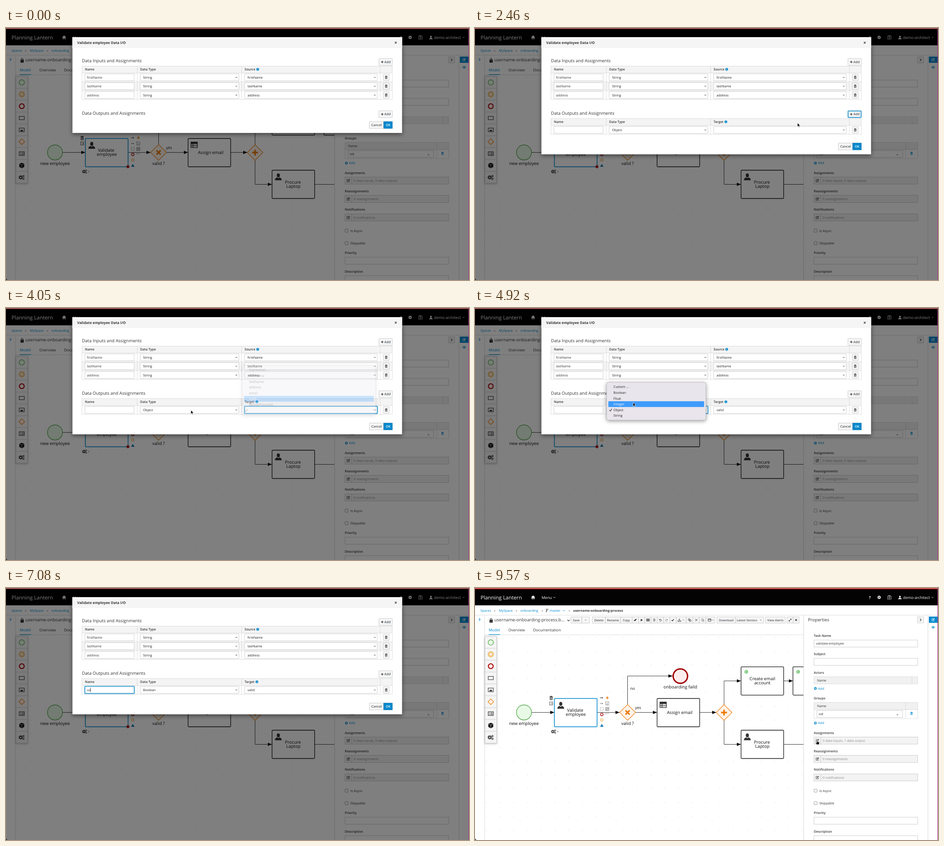
Recreate the animation shown at these times as an HTML page. Size 1015 by 552 pixels, loop 9.6 s.

```html
<!DOCTYPE html>
<html lang="en">
<head>
<meta charset="utf-8">
<title>Data I/O dialog</title>
<style>
html, body { margin: 0; width: 100%; height: 100%; overflow: hidden; background: #fff; }
svg { display: block; width: 1015px; height: 552px; font: 7.2px "Open Sans", sans-serif; text-rendering: geometricPrecision; cursor: default; }
text { white-space: pre; }
</style>
</head>
<body>
<svg id="stage" viewBox="0 0 1015 552"></svg>
<script>
const LOOP = 9600;
const BLUE = '#0088ce', INK = '#363636', LINE = '#d1d1d1', EDGE = '#bbb', ORANGE = '#ec7a08';

// Drawing helpers, all return markup
const R = (x, y, x2, y2, fill = 'none', stroke = 'none', more = '') =>
  `<rect x="${x}" y="${y}" width="${x2 - x}" height="${y2 - y}" fill="${fill}" stroke="${stroke}" stroke-width=".7" ${more}/>`;
const T = (x, y, s, fill = INK, size = 7.2, weight = 400, more = '') =>
  `<text x="${x}" y="${y}" fill="${fill}" font-size="${size}" font-weight="${weight}" ${more}>${s}</text>`;
const P = (d, stroke = INK, w = 1, fill = 'none', more = '') =>
  `<path d="${d}" stroke="${stroke}" stroke-width="${w}" fill="${fill}" ${more}/>`;
const C = (x, y, r, fill, stroke = 'none', w = 1) =>
  `<circle cx="${x}" cy="${y}" r="${r}" fill="${fill}" stroke="${stroke}" stroke-width="${w}"/>`;
const G = (x, y, body, scale = 1) => `<g transform="translate(${x} ${y}) scale(${scale})">${body}</g>`;
const id = (name, body, more = '') => `<g id="${name}" ${more}>${body}</g>`;
const mid = (x, y, s, size = 9.6) => T(x, y, s, '#111', size, 400, 'text-anchor="middle"');

// Icons, centred on x, y
const chev = (x, y, c = INK, s = 1) => G(x, y, P('M-1.9-1L0 .9 1.9-1', c, 1), s);
const right = (x, y, c) => P(`M${x - 1.3} ${y - 2.6}l2.6 2.6-2.6 2.6`, c, 1.2);
const trash = (x, y, c = INK, s = 1) => G(x, y,
  P('M-2.8-2.3H2.8M-1-2.6V-3.2H1V-2.6', c, .9) + P('M-2.1-1.6H2.1V3.2H-2.1Z', c, .7, c, 'fill-opacity=".25"') + P('M-.7-.8V2.4M.7-.8V2.4', c, .5), s);
const person = (x, y, c, s = 1) => G(x, y,
  `<ellipse cy="-3.2" rx="3.4" ry="4.3" fill="${c}"/>` + P('M-7.5 7.5Q-7.5 2.8-2.5 1.3L0 3 2.5 1.3Q7.5 2.8 7.5 7.5Z', 'none', 0, c), s);
const gear = (x, y, c, s = 1) => G(x, y,
  C(0, 0, 2.1, 'none', c, 1.6) + `<circle r="3.3" fill="none" stroke="${c}" stroke-width="1.2" stroke-dasharray="1.3 1.29"/>`, s);
const gears = (x, y, s = 1) => gear(x - 2 * s, y, INK, s) + gear(x + 3 * s, y - 2.4 * s, INK, .55 * s) + gear(x + 3 * s, y + 2.6 * s, INK, .55 * s);
const pen = (x, y, c) => P(`M${x + .8} ${y - 2.4}H${x - 3}V${y + 2.9}H${x + 2.5}V${y + .8}`, c, .8) + P(`M${x - 1} ${y + 1}L${x + 3} ${y - 2.8}`, c, 1.5);
const plus = (x, y, r, c, w) => P(`M${x - r} ${y}h${2 * r}M${x} ${y - r}v${2 * r}`, c, w);
const info = (x, y) => C(x, y, 3, BLUE) + P(`M${x} ${y - .6}v2.3M${x} ${y - 1.9}v.8`, '#fff', .9);
const grid = (x, y, s = 1) => G(x, y, P('M-7-6H7V6H-7ZM-7-2H7M-7 2H7M-2.5-6V6', '#222', 1.3) + R(-7, -6, 7, -3, '#222'), s);
const diamond = (x, y, r, w) => P(`M${x} ${y - r}l${r} ${r}-${r} ${r}-${r}-${r}Z`, ORANGE, w, '#fef3e8');

// Widgets
const input = (x, y, x2, s = '', y2 = y + 15.3) => R(x, y, x2, y2, '#fff', EDGE) + T(x + 4.5, y + 10.4, s);
const select = (x, y, x2, s, name) =>
  R(x, y, x2, y + 15.3, '#fff', EDGE, 'rx=".6"') + T(x + 6.5, y + 10.4, s, '#222', 7.2, 400, name ? `id="${name}"` : '') + chev(x2 - 5.5, y + 7.8);
const button = (x, y, x2, y2, s, tx) => R(x, y, x2, y2, '#f6f6f6', EDGE, 'rx=".6"') + T(tx, (y + y2) / 2 + 2.6, s, '#4d5258', 7.2, 600);
const addBtn = y => button(817.5, y, 847, y + 15, 'Add', 829.6) + plus(824.8, y + 7.5, 2.6, INK, 1.3);

function header() {
  return R(0, 0, 1015, 3, '#c00') + R(0, 2.6, 1015, 38, '#030303') + T(12.3, 25, 'Planning Lantern', '#fff', 11.4) +
    P('M123 20.5L127.4 16.2 131.8 20.5H130.4V24.4H128.3V21.6H126.5V24.4H124.4V20.5Z', 'none', 0, '#fff') +
    T(146, 23.6, 'Menu', '#fff', 8.4) + chev(174, 20.6, '#fff') + T(863.6, 23.6, '?', '#fff', 8.6, 700) + gear(886, 20.5, '#fff') +
    R(904.4, 18, 912.6, 24.4, 'none', '#ddd') + P('M906.8 18V16.4H910.2V18', '#ddd', .9) + C(908.5, 21.2, 1.5, 'none', '#ddd', .9) +
    person(931.5, 20.8, '#fff', .5) + T(938.3, 23.6, 'demo-architect', '#fff', 8.4) + chev(1003, 20.6, '#ddd');
}

function crumbs() {
  const links = [[12, 'Spaces'], [52.6, 'MySpace'], [99.6, 'onboarding'], [163.8, 'master']];
  return links.map(([x, s]) => T(x, 52, s, BLUE)).join('') +
    [41.2, 89, 145.8, 205].map(x => T(x, 51.6, '»', '#666')).join('') +
    P('M156.5 46.5V52M159.6 46.5Q159.6 49.5 156.5 49.8', INK, .9) + C(156.5, 46.4, .9, INK) + C(159.6, 46.4, .9, INK) + C(156.5, 52, .9, INK) +
    chev(194.8, 49.6, BLUE) + T(215.3, 52, 'username-onboarding-process', INK, 7.2, 700) +
    P('M0 59.5H1015', LINE, .7);
}

function toolbar() {
  const y = 70.2;
  const labels = [[210, 234, 'Save'], [257, 286, 'Delete'], [286, 319, 'Rename'], [319, 344.5, 'Copy'],
    [530.5, 571, 'Download'], [571, 633, 'Latest Version'], [637, 680, 'View Alerts']];
  const cells = [[234, 251], [441, 463], [506, 526], [684, 697.3], [697.3, 710.5]];
  for (let i = 0; i < 7; i++) cells.push([344.5 + i * 13.8, 358.3 + i * 13.8]);
  for (let i = 0; i < 3; i++) cells.push([463 + i * 14.3, 477.3 + i * 14.3]);
  return P('M32.3 70H38.3V75.2H32.3ZM33.6 70V67.8Q35.3 64.6 37 67.8V70', INK, 1.1, 'none') + R(32, 70, 38.6, 75.3, INK) +
    T(42.4, 73.4, 'username-onboarding-process.b...', INK, 9.6) + chev(205, 71, INK, 1.3) +
    cells.map(([a, b]) => R(a, 63.2, b, 77, '#f6f6f6', EDGE)).join('') +
    labels.map(([a, b, s]) => R(a, 63.2, b, 77, '#f6f6f6', EDGE) +
      T((a + b) / 2 - (s === 'Latest Version' ? 6 : 0), 72.6, s, '#4d5258', 6.6, 600, 'text-anchor="middle"')).join('') +
    [242.5, 456.5, 521.5, 626.5].map(x => chev(x, y, INK, .8)).join('') +
    P('M348.4 72l3-3.6h3l-3 3.6Z', INK, .6, INK) + P('M363.4 67.4v5.8l4.6-2.9Z', 'none', 0, INK) +
    P('M376 67.6h6.4v5h-6.4ZM376 70h6.4M378.1 67.6v5M380.3 67.6v5', INK, .9) + trash(393, y, '#777', .9) +
    P('M404 68v2h2M404.3 69.6a2.3 2.3 0 1 1 .5 2.7', INK, .9) + P('M422.2 68v2h-2M421.9 69.6a2.3 2.3 0 1 0-.5 2.7', '#888', .9) +
    P('M431 70.2l1.8 1.9 3.2-4', INK, 1.4) + P('M448 67v4M446.2 69.6l1.8 1.8 1.8-1.8M444.8 71v2.2h6.4V71', INK, 1) +
    P('M467.6 67.4h3.4v3.4h-3.4ZM470 69.6h3.4v3.6H470Z', INK, .8) + P('M482.5 67.6l5 4.4M482.5 72.6l5-4.4', INK, .9) +
    P('M496.6 67.4h3.4v4.4h-3.4ZM499 69.6h3v3.6h-3Z', '#888', .8) + P('M511 67.6h6.4v5.2H511ZM511 69.2h6.4', INK, .9) +
    P('M688.4 72.6l4.6-4.6M690.8 67.8h2.4v2.4M690.6 72.8h-2.4v-2.4', INK, 1) + P('M702 68.3l3.8 3.8M705.8 68.3l-3.8 3.8', INK, 1.3) +
    T(30, 94.8, 'Model', BLUE, 8.4) + T(73, 94.8, 'Overview', INK, 8.4) + T(127.5, 94.8, 'Documentation', INK, 8.4) +
    P('M21 102.6H720', LINE, .7) + P('M30 102H55', BLUE, 1.2) + right(10, 69, BLUE) + P('M21 60V552', LINE, .8);
}

function palette() {
  const x = 34.6, y = i => 119.2 + i * 26;
  let s = R(21.8, 106, 47.6, 340, '#f5f5f5', EDGE, 'style="filter:drop-shadow(0 1px 2px #0004)"');
  for (let i = 1; i < 9; i++) s += P(`M21.8 ${106 + i * 26}H47.6`, EDGE, .7);
  return s + C(x, y(0), 5.8, '#e8fae6', '#4aa241', 1.2) + C(x, y(1), 5.9, '#fef0dc', '#e5a02d', 1.1) + C(x, y(1), 3.8, 'none', '#e5a02d', 1) +
    C(x, y(2), 5.3, '#fdecec', '#a30000', 2) + R(29, y(3) - 3.6, 40.2, y(3) + 3.6, 'none', INK, 'style="stroke-width:1.1"') +
    R(29, y(4) - 4, 40.2, y(4) + 4, 'none', INK, 'style="stroke-width:1.1"') + R(32, y(4), 37.4, y(4) + 3, INK) +
    diamond(x, y(5), 6.3, 1.2) + P(`M29 ${y(6) - 4}h11.2v8H29ZM31 ${y(6) - 1.3}h1.6M34 ${y(6) - 1.3}h4.6M31 ${y(6) + 1.5}h1.6M34 ${y(6) + 1.5}h4.6`, INK, 1.2) +
    P(`M${x} ${y(7) - 6}l5.4 2.4v6.6l-5.4 3-5.4-3v-6.6Z`, 'none', 0, '#111') + P(`M${x - 5} ${y(7) - 3.2}l5 2.2 5-2.2M${x} ${y(7) - 1}v6`, '#eee', .7) +
    gears(x, y(8), 1.2);
}

function diagram() {
  const flow = d => P(d, '#222', .9, 'none', 'marker-end="url(#tip)"');
  const task = (x, y, x2, stroke = '#1a1a1a', w = 1.3) => R(x, y, x2, y + 62, '#fff', stroke, `rx="1.5" style="stroke-width:${w}"`);
  const leaf = x => C(x, 183.4, 4, '#7bc67b') + P(`M${x - 4} 182h5M${x - 3} 185h4`, '#fff', .9);
  return R(21.5, 103, 720, 552, 'url(#dots)') +
    flow('M124 272.6H174') + flow('M268 272.6H317') + flow('M334.5 255V192.8H433') + flow('M352 272.6H399') + flow('M492.5 272.6H529') +
    flow('M546 256V203.5H583') + flow('M546 289V342.5H583') + flow('M676.5 203.5H697') + P('M676.5 342.5H720', '#222', .9) +
    C(107.4, 272.6, 16.5, '#e8fae6', '#4aa241', 1.2) + mid(107.4, 300, 'new employee') +
    task(174, 242, 267.6, BLUE, 1.5) + person(188, 257, '#333') + mid(219.6, 271, 'Validate') + mid(221, 280, 'employee') +
    diamond(334.5, 272.6, 17.4, 1.1) + P('M330 268.1l9 9M339 268.1l-9 9', ORANGE, 3.2) + mid(334.4, 300, 'valid ?') +
    T(351, 265.2, 'yes', '#111', 8.4) + T(340.3, 223, 'no', '#111', 8.4) +
    C(450.2, 193, 15.8, '#fdeeee', '#a30000', 3) + mid(450.2, 219.8, 'onboarding faild') +
    task(399.2, 242, 492.5) + grid(412.5, 255.8) + mid(448.7, 276, 'Assign email') +
    diamond(546, 272.8, 17.2, 1.1) + plus(546, 272.8, 6.4, ORANGE, 3.4) +
    task(583.3, 172.6, 676.6) + leaf(594.5) + mid(630, 201.8, 'Create email') + mid(630, 210.6, 'account') +
    task(697, 172.6, 790) + leaf(708) +
    task(583.3, 311.5, 676.6) + person(597, 326, '#333') + mid(629, 340.8, 'Procure') + mid(630, 349.6, 'Laptop') +
    trash(167, 241, INK, 1.25) + R(163.4, 249.6, 170.6, 256.4, '#fff', INK) + P('M165 252h1M167 252h2.6M165 254.4h1M167 254.4h2.6', INK, .8) +
    P('M274 240.5h6M278.4 238.8l1.8 1.7-1.8 1.7', INK, 1) + plus(290, 240.5, 3, ORANGE, 1.7) +
    P('M274 253h6M278.6 251.6l1.5 1.4-1.5 1.4', INK, .7) + R(286.6, 249.6, 293.6, 256.6, '#fff', '#666') + C(290, 254, .9, INK) +
    R(274.6, 261.8, 281.4, 268.4, '#fff', '#777', 'stroke-dasharray="1.2 .6"') + R(286.6, 261.8, 293.6, 268.4, '#ddd', '#555') + P('M288 267l4-4', INK, .8) +
    C(278, 277, 2.9, '#fdecec', '#a30000', 1.2) + P('M286 277v-2h8', '#8a5560', .8, 'none', 'stroke-dasharray="1.5 .7"') +
    C(278, 289, 3, '#fef0dc', '#e5a02d', .9) + P('M278 297.6l3.8 6.4h-7.6Z', 'none', 0, '#1f7fb5') +
    gears(172.6, 314.4) + P('M180.6 312.6l1.7 1.8-1.7 1.8', INK, .9) + id('handle', C(267.3, 303.8, 3, '#c0202a', '#7a1015', .6));
}

function panel() {
  const label = (y, s) => T(742.8, y + 2.6, s, INK, 7.2, 600);
  const add = y => C(746.2, y, 2.9, BLUE) + plus(746.2, y, 1.6, '#fff', 1) + T(752, y + 2.6, 'Add', BLUE);
  const note = (y, s, name) => R(743, y, 970.6, y + 15.6, '#f3f3f3', EDGE) + P(`M758 ${y}v15.6`, EDGE, .7) + pen(750.6, y + 7.8, INK) +
    T(762, y + 10.4, s, '#8b8d8f', 7.2, 400, name ? `id="${name}"` : '');
  const head = (y, x) => R(743, y, 970.6, y + 15.4, '#f1f1f1', LINE) + P(`M${x} ${y}v15.4`, LINE, .7) + T(750, y + 10.4, 'Name');
  const check = (y, s) => R(743.3, y - 3.4, 750, y + 3.3, '#fff', '#777', 'rx="1"') + T(755, y + 2.6, s);
  const labels = ['Task Name', 'Subject', 'Actors', 'Groups'];
  return R(720.5, 60, 1015, 552, '#fff') + P('M720.5 60V552M993 60V552', LINE, .9) + T(730, 73.4, 'Properties', INK, 9.6) +
    R(970, 63, 983.4, 76.4, '#f6f6f6', EDGE) + right(976.8, 69.7, INK) + R(995, 62.6, 1014, 76.2, BLUE) + pen(1004.4, 69.4, '#fff') +
    P('M1000.4 86q4-4.8 8 0q-4 4.8-8 0Z', BLUE, .9) + C(1004.4, 86, 1.5, BLUE) +
    labels.map((s, i) => label([104, 144.8, 185, 241.2][i], s)).join('') +
    input(743, 114, 970.6, 'validate-employee') + input(743, 154, 970.6) + head(194.6, 958) + add(220) +
    head(250.8, 944) + R(743, 266.2, 970.6, 286, '#fff', LINE) + P('M944 266V286', LINE, .7) +
    R(749.4, 268.4, 937.6, 283.6, '#fff', EDGE) + T(753.6, 278.6, 'HR') + chev(926, 277.6) + trash(957, 274.6, BLUE, .9) + add(295.8) +
    label(317, 'Assignments') + note(326.4, '', 'summary') + label(357.3, 'Reassignments') + note(366.6, '0 reassignments') +
    label(397.8, 'Notifications') + note(407.2, '0 notifications') + check(444, 'Is Async') + check(471.4, 'Skippable') +
    label(492.7, 'Priority') + input(743, 502, 970.6) + label(533, 'Description') + R(743, 542.6, 970.6, 570, '#fff', EDGE);
}

function table(y, rows, last) {
  const end = y + 15 + rows.length * 19.4;
  let s = R(166.6, y, 847, y + 15, '#f4f4f4') + T(173, y + 9.6, 'Name', INK, 7.2, 600) + T(294, y + 9.6, 'Data Type', INK, 7.2, 600) +
    T(523, y + 9.6, last, INK, 7.2, 600) + info(last === 'Source' ? 551.8 : 550, y + 7);
  rows.forEach(([a, b, c, live], i) => {
    const top = y + 15 + i * 19.4;
    s += R(166.6, top, 847, top + 19.4, i % 2 ? '#f5f5f5' : '#fff') + P(`M166.6 ${top}H847`, LINE, .7) +
      input(173, top + 2, 281, a) + select(294, top + 2, 510.5, b, live && 'typeValue') + select(523, top + 2, 814, c, live && 'targetValue') +
      R(827, top + 2.6, 840, top + 16.8, '#f6f6f6', EDGE, 'rx=".6"') + trash(833.5, top + 9.7, INK, .95);
  });
  return s + R(166.6, y, 847, end, 'none', LINE) + P(`M287.8 ${y}V${end}M516.6 ${y}V${end}M820.6 ${y}V${end}`, LINE, .7);
}

function focusBox(name, x, y, x2, y2) {
  return id(name, R(x - .6, y - .6, x2 + .6, y2 + .6, 'none', '#0088ce66', 'rx="1.2" style="stroke-width:2"') + R(x, y, x2, y2, 'none', BLUE, 'rx=".6" style="stroke-width:1"'));
}

const PITCH = 12.65;
function menu(name, x, x2, first, items, checked) {
  const end = first + (items.length - 1) * PITCH, cy = first + checked * PITCH;
  return id(name, R(x, first - 9.6, x2, end + 9.6, '#e9e5ec', '#b9b5bc', 'rx="3.6" style="filter:drop-shadow(0 2px 4px #0006)"') +
    R(x + 3.8, first - 6.3, x2 - 3.8, first + 6.3, '#3e9bfa', 'none', 'class="bar"') +
    items.map((s, i) => T(x + 15, first + i * PITCH + 2.6, s, '#222', 7.2, 400, 'class="item"')).join('') +
    P(`M${x + 6} ${cy + .4}l2 2.2 3.4-5`, '#222', 1.1));
}

function dialog() {
  const fields = ['firstName', 'lastName', 'address'].map(s => [s, 'String', s]);
  return R(145.5, 20, 868.4, 230, '#fff', '#0003', 'id="box" style="filter:drop-shadow(0 3px 5px #0007)"') +
    R(145.5, 20, 868.4, 44, '#f5f5f5') + T(156, 34.9, 'Validate employee Data I/O', INK, 7.8, 700) + P('M852.5 30.2l3.8 3.8M856.3 30.2l-3.8 3.8', INK, 1.1) +
    T(166.5, 75, 'Data Inputs and Assignments', INK, 9.6) + addBtn(66.8) + table(83.4, fields, 'Source') +
    T(166.5, 189.6, 'Data Outputs and Assignments', INK, 9.6) + addBtn(181.3) +
    id('outputs', table(198.6, [['', 'Object', '', true]], 'Target')) +
    focusBox('addFocus', 818.2, 182, 846.2, 195.6) + focusBox('targetFocus', 523, 215.6, 814, 230.9) +
    focusBox('typeFocus', 294, 215.6, 510.5, 230.9) + focusBox('nameFocus', 173, 215.6, 281, 230.9) +
    T(177.5, 226, '', INK, 7.2, 400, 'id="typed"') + R(177.2, 218.2, 177.9, 228.2, '#111', 'none', 'id="caret"') +
    id('footer', button(796.6, 205, 828, 220, 'Cancel', 800.8) + R(828, 205, 847, 220, BLUE, '#00659c', 'id="ok"') + T(832.4, 215.1, 'OK', '#fff', 7.2, 600) +
      id('okFocus', R(828, 205, 847, 220, 'none', '#004a75', 'style="stroke-width:1.6"') + R(829.4, 206.4, 845.6, 218.6, 'none', '#fff')));
}

const pointers = id('arrow', P('M0 0V8.4L2 6.6 3.3 9.5 4.7 8.9 3.4 6.1H6.1Z', '#fff', .7, '#000')) +
  id('hand', P('M-.9 0Q0-1 .9 0V3.2L4.3 4Q5 4.4 4.8 5.6L4 9.4H-.9L-3.5 5.8Q-3.4 4.6-2.3 5L-.9 6Z', '#fff', .8, '#000')) +
  id('ibeam', P('M-1.6-4.4H1.6M0-4.4V4.4M-1.6 4.4H1.6', '#222', .8));

const stage = document.getElementById('stage');
stage.innerHTML = `<defs>
  <marker id="tip" viewBox="0 0 9 7" refX="9" refY="3.5" markerWidth="9" markerHeight="7" markerUnits="userSpaceOnUse" orient="auto"><path d="M0 0L9 3.5 0 7Z"/></marker>
  <pattern id="dots" x="24.5" y="108" width="30.1" height="30.1" patternUnits="userSpaceOnUse"><rect width="1" height="1" fill="#b8b8b8"/></pattern></defs>` +
  R(0, 0, 1015, 552, '#fff') + header() + crumbs() + toolbar() + diagram() + palette() + panel() +
  R(0, 0, 1015, 552, '#000', 'none', 'id="shade"') + id('modal', dialog()) +
  menu('targetMenu', 518, 810, 135.6, ['Expression ...', 'firstName', 'lastName', 'address', 'email', 'valid', 'laptopProcured', ''], 7) +
  menu('typeMenu', 288.6, 506, 172.6, ['Custom ...', 'Boolean', 'Float', 'Integer', 'Object', 'String'], 4) +
  R(0, 0, 1015, .9, '#ddd') + R(1013.9, 0, 1015, 552, '#a8328a') + P('M0 547Q0 552 5 552H0Z', 'none', 0, '#111') +
  id('pointer', pointers);

const el = {};
stage.querySelectorAll('[id]').forEach(n => el[n.id] = n);

// [time, x, y] stops of the pointer
const path = [[30, 751, 334], [180, 751, 334], [930, 831, 190], [2250, 831, 190], [2640, 610, 222], [2790, 606, 223],
  [3300, 566, 200], [3780, 562, 199], [4080, 401, 224.4], [4560, 400, 224], [4920, 346.5, 207], [5220, 328, 186], [5430, 326, 186],
  [6120, 232, 224], [8220, 232, 224], [9120, 836, 257], [9270, 836, 257], [9540, 750, 333.6]];
const kinds = [[0, ''], [30, 'arrow'], [870, 'hand'], [2280, 'arrow'], [5970, 'ibeam'], [6480, ''], [8220, 'ibeam'], [8340, 'arrow'], [9060, 'hand']];
const typing = [[0, ''], [6990, 'v'], [7080, 'va'], [7290, 'val'], [7410, 'vali'], [7560, 'valid']];

const clamp = v => Math.max(0, Math.min(1, v));
const at = (steps, t) => steps.reduce((v, s) => t >= s[0] ? s[1] : v, steps[0][1]);
const show = (n, on) => n.setAttribute('visibility', on ? 'visible' : 'hidden');
const during = (t, a, b) => t >= a && t < b;

function place(t) {
  const i = path.findIndex(p => p[0] > t);
  if (i === 0) return path[0].slice(1);
  if (i < 0) return path[path.length - 1].slice(1);
  const [t0, x0, y0] = path[i - 1], [t1, x1, y1] = path[i];
  const k = (t - t0) / (t1 - t0), e = k * k * (3 - 2 * k);
  return [x0 + (x1 - x0) * e, y0 + (y1 - y0) * e];
}

function drawMenu(n, t, open, click, first) {
  const alpha = t < open ? 0 : 1 - clamp((t - click - 130) / 210);
  n.setAttribute('opacity', alpha);
  show(n, alpha > 0);
  const items = [...n.querySelectorAll('.item')];
  const hit = Math.max(0, Math.min(items.length - 1, Math.round((place(Math.min(t, click))[1] - first) / PITCH)));
  n.querySelector('.bar').setAttribute('y', first + hit * PITCH - 6.3);
  items.forEach((s, i) => s.setAttribute('fill', i === hit ? '#fff' : '#222'));
}

function draw(t) {
  const tall = t >= 1560, fade = clamp((t - 9285) / 150);
  const [x, y] = place(t), kind = at(kinds, t), word = at(typing, t);

  el.box.setAttribute('height', tall ? 256.8 : 210);
  el.footer.setAttribute('transform', `translate(0 ${tall ? 47 : 0})`);
  el.modal.setAttribute('opacity', 1 - fade);
  el.modal.setAttribute('transform', `translate(0 ${-40 * fade * (2 - fade)})`);
  el.shade.setAttribute('opacity', .5 * (1 - clamp((t - 9430) / 130)));
  show(el.outputs, tall);
  show(el.handle, t < 9430);

  show(el.addFocus, during(t, 1560, 2790));
  show(el.targetFocus, during(t, 2790, 4530));
  show(el.typeFocus, during(t, 4530, 6300));
  show(el.nameFocus, t >= 6300);
  show(el.okFocus, t >= 9210);
  el.ok.setAttribute('fill', t >= 9090 ? '#0074b0' : BLUE);

  el.targetValue.textContent = t >= 4110 ? 'valid' : '';
  el.typeValue.textContent = t >= 5760 ? 'Boolean' : 'Object';
  el.summary.textContent = t >= 9300 ? '3 data inputs, 1 data output' : '0 data inputs, 0 data outputs';
  if (el.typed.textContent !== word) el.typed.textContent = word;
  el.caret.setAttribute('x', 177.2 + (word ? el.typed.getComputedTextLength() + .3 : 0));
  show(el.caret, during(t, 6300, 6810) || during(t, 6990, 8070) || during(t, 8580, 9090));

  drawMenu(el.targetMenu, t, 2790, 3770, 135.6);
  drawMenu(el.typeMenu, t, 4530, 5420, 172.6);

  el.pointer.setAttribute('transform', `translate(${x} ${y})`);
  for (const k of ['arrow', 'hand', 'ibeam']) show(el[k], k === kind);
}

const start = performance.now();
function tick() {
  draw((performance.now() - start) % LOOP);
  requestAnimationFrame(tick);
}
tick();
</script>
</body>
</html>
```
